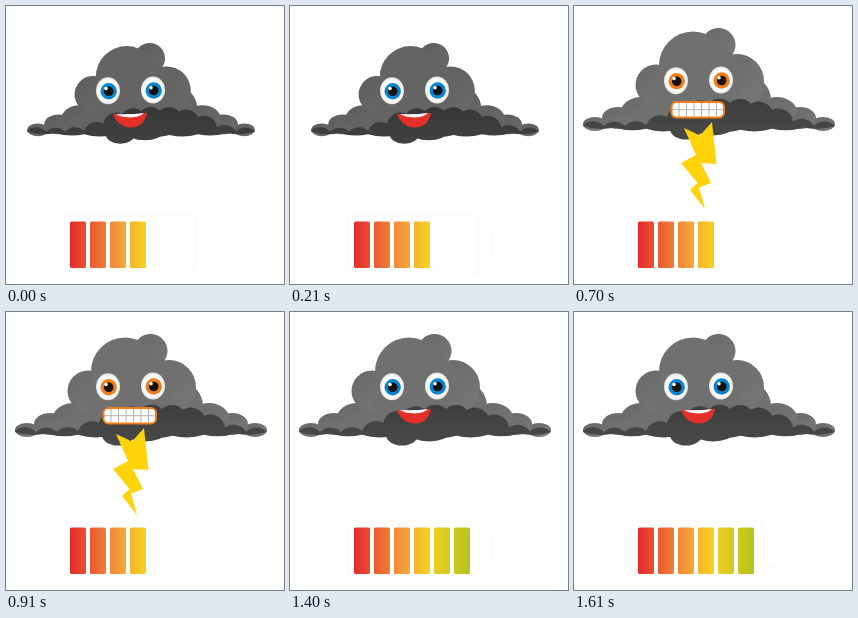
These frames come from a looping animation (278x278 px, 1750 ms). An HTML page:

```html
<!DOCTYPE html>
<html lang="en">
<head>
<meta charset="utf-8">
<title>Charging cloud</title>
<style>
  html, body { margin: 0; width: 100%; height: 100%; overflow: hidden; background: #fff; }
  svg { display: block; width: 100%; height: 100%; }
</style>
</head>
<body>
<svg viewBox="0 0 278 278">
  <defs>
    <linearGradient id="charge" gradientUnits="userSpaceOnUse" x1="64" y1="0" x2="180" y2="0">
      <stop offset="0" stop-color="#e52a2d"/>
      <stop offset=".4" stop-color="#f3953b"/>
      <stop offset=".63" stop-color="#f6cf22"/>
      <stop offset="1" stop-color="#b3c41e"/>
    </linearGradient>
    <linearGradient id="puff" x1="0" y1="0" x2="1" y2="1">
      <stop offset="0" stop-color="#686867"/>
      <stop offset="1" stop-color="#787877"/>
    </linearGradient>
    <linearGradient id="shade" x1="0" y1="0" x2="0" y2="1">
      <stop offset="0" stop-color="#3d3d3d"/>
      <stop offset="1" stop-color="#484848"/>
    </linearGradient>
    <radialGradient id="eyeball">
      <stop offset=".75" stop-color="#fff"/>
      <stop offset="1" stop-color="#e3e3e3"/>
    </radialGradient>
  </defs>
  <g id="cloud"></g>
  <g id="face"></g>
  <path id="bolt" fill="#ffd20a"/>
  <path id="sparks" fill="none" stroke="#ffd20a" stroke-width="1.3"/>
  <g id="battery" fill="none" stroke="#fcfcfc" stroke-width="3">
    <rect x="58" y="208" width="131" height="59" rx="4"/>
    <path d="M190 219h8q4 0 4 4v28q0 4-4 4h-8"/>
  </g>
  <g id="bars" fill="url(#charge)"></g>
</svg>
<script>
const STEP = 350, MID = 135;
const BLUE = '#0785d1', RED = '#e4302a', ORANGE = '#ef7d1c', GREY = '#70706f';
const $ = id => document.getElementById(id);
const repeat = (n, draw) => Array.from({ length: n }, (_, i) => draw(i)).join('');
const ellipse = (x, y, rx, ry, fill) =>
  `<ellipse cx="${x}" cy="${y}" rx="${rx}" ry="${ry}" fill="${fill}"/>`;
const circle = (x, y, r, fill) => ellipse(x, y, r, r, fill);

// Row of equal-width arcs whose ends lie on the curve y = edge(x).
function scallops(from, to, count, radius, edge) {
  return repeat(count, i => {
    const x = from + (to - from) * (i + 1) / count;
    return `A${radius} ${radius} 0 0 1 ${x} ${edge(x)}`;
  });
}

function drawCloud() {
  const bothSides = draw => draw(-1) + draw(1);
  const arms = bothSides(side => repeat(3, i => {
    const k = 2 - i;
    return ellipse(MID + side * (68 + 23 * k), 106 + 6 * k, 20 - 4 * k, 15 - 4 * k, 'url(#puff)');
  }));
  const shoulders = bothSides(side => circle(MID + side * 38, 94, 24, GREY));
  const top = edgeX => 120 - 23 * Math.exp(-(((edgeX - 152) / 60) ** 4));
  const bottom = edgeX => 120 + 4 * Math.sin(Math.PI * (edgeX - 9) / 252);
  return arms + shoulders +
    `<path d="M30 120L78 96H192L240 120Z" fill="${GREY}"/>` +
    circle(82, 79, 20.5, 'url(#puff)') + circle(163, 75, 27, 'url(#puff)') +
    circle(144.5, 39, 17, 'url(#puff)') +
    circle(119, 59.5, 34, GREY) + circle(138, 72, 31, GREY) + ellipse(118, 94, 36, 24, GREY) +
    ellipse(112, 123, 16, 10.5, '#484848') + ellipse(139, 121, 20, 8.5, '#484848') +
    `<path fill="url(#shade)" d="M9 119${scallops(9, 261, 12, 15, top)}${scallops(261, 9, 8, 60, bottom)}Z"/>`;
}

const eye = (x, y, color) => ellipse(x, y, 12, 13.5, 'url(#eyeball)') + circle(x + .7, y + .5, 8.2, color) +
  circle(x + .7, y + .5, 4.8, '#17110f') + circle(x - 2, y - 2.3, 1.8, '#fff');
const eyes = color => eye(102, 74.8, color) + eye(147, 74, color);

const smile = `<path d="M107 98Q124 99 141 97Q138 111 125 111.5Q112 111 107 98Z" fill="${RED}"/>` +
  '<path d="M110 98Q124 99 138 97Q134 101 125 101.5Q114 101 110 98Z" fill="#fff"/>';

function teeth(x, y, w, h) {
  const gaps = repeat(6, i => `M${x + w * (i + 1) / 7} ${y + 1}v${h - 2}`);
  const box = `<rect x="${x}" y="${y}" width="${w}" height="${h}" rx="5"`;
  return `${box} fill="#fff"/>` +
    `<path d="M${x} ${y + h / 2}h${w}${gaps}" stroke="#b0b0b0"/>` +
    `${box} fill="none" stroke="${ORANGE}" stroke-width="2"/>`;
}

function burst(x, y) {
  return repeat(6, i => {
    const a = Math.PI * (1.02 + i * .192);
    const at = r => `${x + r * Math.cos(a)} ${y + r * .8 * Math.sin(a)}`;
    return `M${at(5)}L${at(11)}`;
  });
}

const wideBolt = 'M110 122L126 129.5 138 116 142.5 158 127 157 137 177 125 181.500 131 203 116 184 123.500 177 107 157 122 149Z';
const thinBolt = 'M119 126H132L126 146 137 150 128 170 137 174 124 202 121 184 117 184 124 160 112 161Z';

const happy = eyes(BLUE) + smile;
const poses = [
  { bars: 4, face: happy, small: true },
  { bars: 1, face: eyes(RED) + circle(123.5, 101.5, 10.3, RED) },
  { bars: 4, face: eyes(ORANGE) + teeth(97.5, 96, 52.5, 15.5), bolt: wideBolt },
  { bars: 5, face: eyes(ORANGE) + teeth(101.5, 95, 45, 12.8), bolt: thinBolt, sparks: burst(123, 202) },
  { bars: 6, face: happy }
];

function show({ bars, face, small, bolt = '', sparks = '' }) {
  $('cloud').setAttribute('transform', small ? 'translate(12.9 17) scale(.905)' : '');
  $('cloud').style.filter = small ? 'brightness(.89)' : '';
  $('face').setAttribute('transform', small ? 'translate(0 10)' : '');
  $('face').innerHTML = face;
  $('bolt').setAttribute('d', bolt);
  $('sparks').setAttribute('d', sparks);
  $('battery').style.display = bolt ? 'none' : '';
  $('bars').innerHTML = repeat(bars, i =>
    `<rect x="${64 + 20 * i}" y="215.5" width="16" height="46.5" rx="1.5"/>`);
}

$('cloud').innerHTML = drawCloud();
let current = -1;
const start = performance.now();
function tick() {
  const next = Math.floor((performance.now() - start) / STEP) % poses.length;
  if (next !== current) show(poses[current = next]);
  requestAnimationFrame(tick);
}
tick();
</script>
</body>
</html>
```
